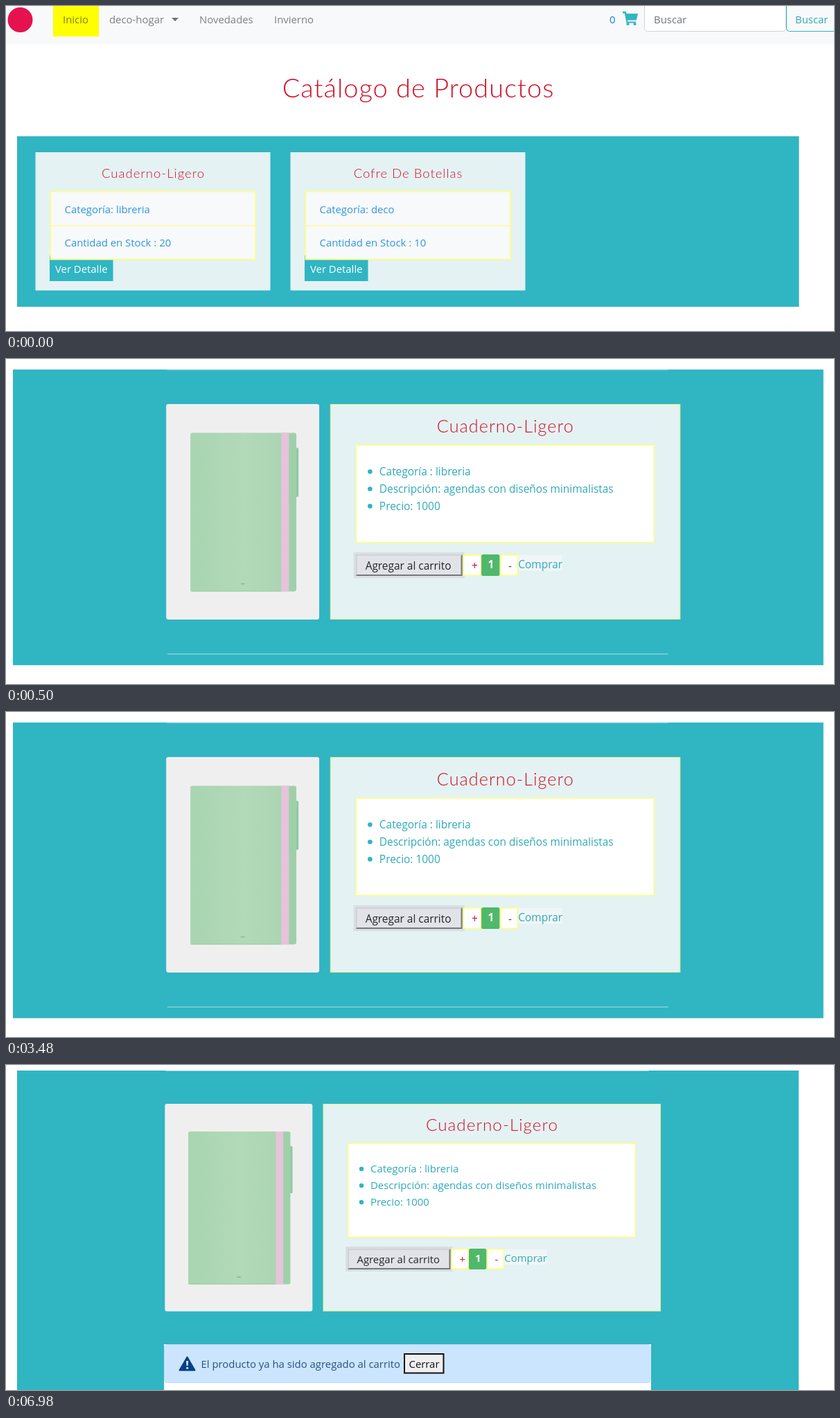
Recreate the animation shown at these times as an HTML page. Size 1195 by 469 pixels, loop 8 s.

```html
<!DOCTYPE html>
<html lang="es">
<head>
<meta charset="utf-8">
<title>Catálogo de Productos</title>
<style>
  html, body { margin: 0; width: 100%; height: 100%; overflow: hidden; background: #fff; }
  svg { display: block; width: 1195px; height: 469px; }
  text { font: 14.9px "Open Sans", "Noto Sans", sans-serif; white-space: pre; }
  .title { font-family: Lato, sans-serif; font-weight: 300; letter-spacing: 1px; text-anchor: middle; fill: #d20f26; }
</style>
</head>
<body>
<svg id="stage" viewBox="0 0 1195 469"></svg>
<script>
const LOOP = 8000, OPEN_DETAIL = 500, SHOW_ALERT = 5460;
const TEAL = '#30b5c3', PALE = '#e4f2f3', YELLOW = '#ffff70', LIGHT = '#f8f9fa';
const LINK = '#2f96e0', GREY = '#7f8081', RED = '#d20f26', INK = '#2fa9b8';

const rect = (x, y, w, h, fill, extra = '') =>
  `<rect x="${x}" y="${y}" width="${w}" height="${h}" fill="${fill}" ${extra}/>`;
const frame = (x, y, w, h, fill, stroke, width = 1, extra = '') =>
  rect(x + width / 2, y + width / 2, w - width, h - width, fill,
    `stroke="${stroke}" stroke-width="${width}" ${extra}`);
const text = (x, y, str, fill, extra = '') =>
  `<text x="${x}" y="${y}" fill="${fill}" ${extra}>${str}</text>`;
const title = (x, y, str, size) =>
  `<text class="title" x="${x}" y="${y}" style="font-size:${size}px">${str}</text>`;
const path = (d, fill, extra = '') => `<path d="${d}" fill="${fill}" ${extra}/>`;
const dot = (x, y, r, fill) => `<circle cx="${x}" cy="${y}" r="${r}" fill="${fill}"/>`;

const navbar = () =>
  rect(0, 0, 1195, 55, LIGHT) +
  dot(20.5, 20, 18, '#e5124f') +
  rect(68, 0, 66, 44, '#ff0') +
  text(82, 25, 'Inicio', '#7f7f0c') +
  text(149, 25, 'deco-hogar', GREY) +
  path('M239 17h10l-5 5z', '#707172') +
  text(279, 25, 'Novedades', GREY) +
  text(387, 25, 'Invierno', GREY) +
  text(871, 25, '0', '#147fdc') +
  path('M890 8h4.8l.8 3H912l-2.2 9.5H897l.4 2H909v2H895.600L892.800 10.500H890z', TEAL) +
  dot(897.5, 26, 2.1, TEAL) + dot(907.5, 26, 2.1, TEAL) +
  frame(921, -6, 205, 43, '#fff', '#ced4da', 1, 'rx="4"') +
  text(935, 25, 'Buscar', '#6c757d') +
  frame(1126, -6, 75, 43, LIGHT, TEAL, 1, 'rx="4"') +
  text(1139, 25, 'Buscar', INK);

const productCard = (x, name, category, stock) =>
  `<g transform="translate(${x})">` +
  rect(0, 211, 339, 199.5, PALE) +
  title(170, 248, name, 18.5) +
  rect(20.5, 360, 91.5, 37, TEAL) +
  frame(21, 267, 297.5, 99.5, LIGHT, YELLOW, 1.5) +
  rect(21, 316.5, 297, 1, YELLOW) +
  text(42, 299, 'Categoría: ' + category, LINK) +
  text(42, 347, 'Cantidad en Stock : ' + stock, LINK) +
  text(28.5, 385, 'Ver Detalle', '#fff') +
  '</g>';

const catalog = () =>
  navbar() +
  title(595, 132, 'Catálogo de Productos', 38) +
  rect(16, 188, 1128.5, 246, TEAL) +
  productCard(42.5, 'Cuaderno-Ligero', 'libreria', 20) +
  productCard(410.5, 'Cofre De Botellas', 'deco', 10);

const notebook = () =>
  rect(229.300, 56, 213, 299.5, '#efefef', 'rx="3"') +
  rect(408, 117, 5.5, 68, '#8fcaa3', 'rx="1.5"') +
  rect(263, 96, 147.5, 220.5, 'url(#cover)', 'rx="3"') +
  rect(400, 97, 10, 219, '#9fd0aa', 'rx="3"') +
  rect(389.5, 96, 10.5, 220.5, '#e7c3db') +
  rect(263, 315.5, 126, 1, '#9bcaa6') +
  rect(333, 305, 6, 2, '#93bd9c', 'rx="1"');

const bullet = (y, str) => dot(513, y - 5, 3.2, TEAL) + text(526, y, str, INK);

const buttons = () =>
  rect(490, 262, 154.5, 36, '#d9dfe3') +
  rect(493, 265, 148.5, 30, '#e1e3e8') +
  path('M493 265h148.500l-2 2H495v26l-2 2z', '#d0d2d6') +
  path('M641.500 265v30H493l2-2h144.500v-26z', '#77797c') +
  text(506.5, 286, 'Agregar al carrito', '#212529') +
  frame(642.5, 265, 26, 30, '#fff', YELLOW, 1.5) +
  text(654.5, 286, '+', RED) +
  rect(668, 265, 25.3, 30, '#50b86b', 'rx="2.5"') +
  text(677, 284, '1', '#fff', 'style="font-weight:700"') +
  frame(694, 265, 25.3, 30, '#fff', YELLOW, 1.5) +
  text(705.5, 286, '-', RED) +
  rect(719.3, 266, 61, 22, '#f0f6f8') +
  text(719.3, 284, 'Comprar', INK);

const detail = bottom =>
  rect(16, 8, 1128, bottom - 8, TEAL) +
  rect(230.5, 8, 697.5, 1, '#90d4dc') +
  notebook() +
  frame(457.5, 56, 487.5, 299.5, PALE, '#e9f48a') +
  title(701.5, 95, 'Cuaderno-Ligero', 24.3) +
  frame(493, 112.5, 416, 136.5, '#fff', YELLOW, 1.3) +
  bullet(155, 'Categoría : libreria') +
  bullet(179, 'Descripción: agendas con diseños minimalistas') +
  bullet(203, 'Precio: 1000') +
  buttons();

const notice = () =>
  rect(228, 403, 703, 66, '#fff') +
  frame(228, 403, 702.5, 56, '#cce5ff', '#bddcff', 1, 'rx="4"') +
  path('M261.500 421.500L272.500 440.500H250.500z', '#063f85', 'stroke="#063f85" stroke-width="2" stroke-linejoin="round"') +
  path('M260 427h3.200l-.5 7h-2.200z', '#cce5ff') + dot(261.6, 437.3, 1.6, '#cce5ff') +
  text(281.5, 437, 'El producto ya ha sido agregado al carrito', '#285082') +
  frame(574, 416, 58.5, 29.5, '#efefef', '#111', 2) +
  text(581.5, 437, 'Cerrar', '#111');

const defs = `<defs><linearGradient id="cover">
  <stop offset="0" stop-color="#a9d5b1"/><stop offset=".5" stop-color="#b2d9b8"/>
  <stop offset="1" stop-color="#a9d4b0"/></linearGradient></defs>`;

const stage = document.getElementById('stage');
stage.innerHTML = defs +
  `<g>${catalog()}</g>` +
  // The detail page is slightly larger until the notice brings in a scrollbar.
  `<g transform="translate(-6.600 6.900) scale(1.037 1.038)">${detail(419)}${rect(231, 403, 697, 1, '#a5dce2')}</g>` +
  `<g>${detail(469)}${notice()}</g>`;
const scenes = stage.querySelectorAll(':scope > g');

function draw(now) {
  const t = now % LOOP;
  const current = t < OPEN_DETAIL ? 0 : t < SHOW_ALERT ? 1 : 2;
  scenes.forEach((scene, i) => scene.style.display = i === current ? '' : 'none');
}

const start = performance.now();
function tick() {
  draw(performance.now() - start);
  requestAnimationFrame(tick);
}
tick();
</script>
</body>
</html>
```
